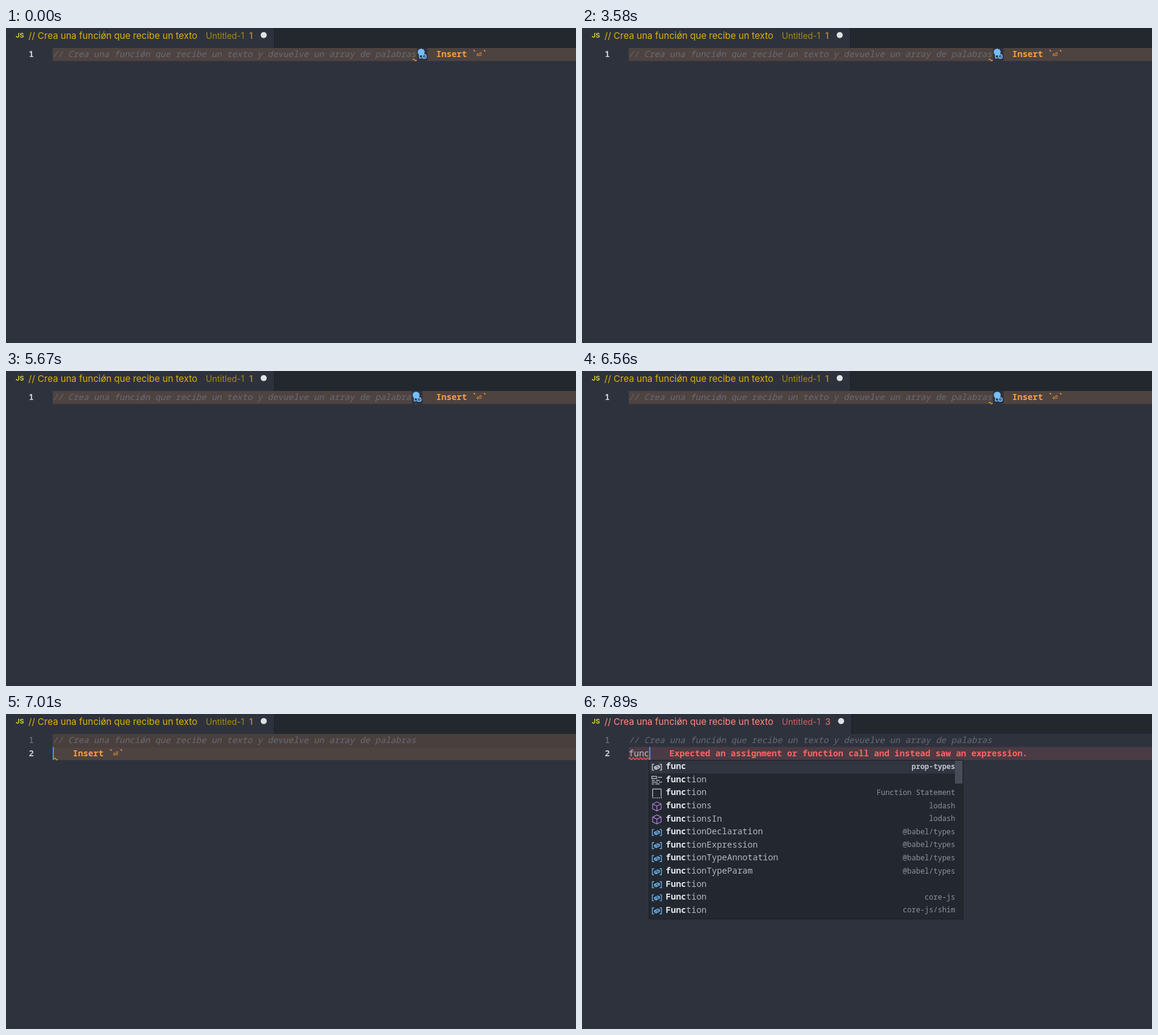
Recreate the animation shown at these times as an HTML page. Size 940x521 px, loop 8 s.

```html
<!DOCTYPE html>
<html lang="es">
<head>
<meta charset="utf-8">
<title>Editor</title>
<style>
  html, body { margin: 0; width: 100%; height: 100%; overflow: hidden; background: #2e323d; }
  svg { display: block; width: 940px; height: 521px; }
  text { white-space: pre; }
  .ui { font-family: Inter, "Open Sans", sans-serif; }
  .code { font: 500 14px "Noto Sans Mono", "DejaVu Sans Mono", monospace; letter-spacing: .04px; }
  .comment { font-style: italic; fill: #686c77; }
  .num { text-anchor: end; fill: #7d818b; }
  .num.active { fill: #c9ccd3; font-weight: 600; }
  .note { font-weight: 600; }
  .label { fill: #b3b8c1; }
  .label .hit { fill: #e4e7ec; font-weight: 700; }
  .detail { font-size: 12px; letter-spacing: 0; text-anchor: end; fill: #8d929b; }
  .detail.picked { fill: #bfc3ca; font-weight: 600; }
  .line { fill: none; stroke-width: 1.2; }
</style>
</head>
<body>
<svg viewBox="0 0 940 521" xmlns="http://www.w3.org/2000/svg">
  <defs>
    <g id="variable" class="line" stroke="currentColor">
      <path d="M4 -5H1V5H4M13 -5H16V5H13"/>
      <path d="M4.500 -.5L10 -3.200L12.800 -1.800V.8L7.300 3.500L4.500 2.100ZM4.500 -.5L7.300 .9L12.800 -1.800M7.300 .9V3.500"/>
    </g>
    <g id="keyword" class="line" stroke="currentColor">
      <path d="M0 -6.500H8V-3H0ZM10 -5H17M0 0H5M7 0H13M0 3H10M12 3H17M0 6H4M6 6H13"/>
    </g>
    <g id="snippet" class="line" stroke="currentColor">
      <path d="M1.500 6V-7H15.500V6"/>
      <path d="M1 7.500H17" stroke-dasharray="2 1.500"/>
    </g>
    <g id="method" class="line" stroke="currentColor">
      <path d="M8.500 -7.500L15.500 -4V4L8.500 7.500L1.500 4V-4ZM1.500 -4L8.500 -.5L15.500 -4M8.500 -.5V7.500"/>
    </g>
    <g id="bulb">
      <rect width="17.400" height="21.600" fill="#2e323d"/>
      <circle cx="6.900" cy="6.900" r="5.700" fill="#75beff"/>
      <path d="M4 11V16.500H8" fill="none" stroke="#75beff" stroke-width="1.500"/>
      <circle cx="12" cy="14.200" r="3" fill="#2e323d" stroke="#75beff" stroke-width="1.700"/>
      <circle cx="12" cy="14.200" r="1" fill="#75beff"/>
    </g>
  </defs>
  <g id="stage"></g>
</svg>
<script>
const LOOP = 8000, X0 = 77, CH = 8.44, ROW = 21.6, TOP = 33;
const COMMENT = "// Crea una funciǿn que recibe un texto y devuelve un array de palabras";
const ERROR = "Expected an assignment or function call and instead saw an expression.";
const BLINKS = [150, 600, 1190, 1640, 2090, 2690, 3130, 3580, 4180, 4630, 5070, 6260, 6860];
const TYPED = [7155, 7450, 7600, 7745];
const BULBS = [[0, 71], [5220, 0], [5520, 70], [6110, 0], [6560, 71], [7010, 0]];
const ITEMS = [
  ["variable", "func", "prop-types"],
  ["keyword", "function", ""],
  ["snippet", "function", "Function Statement"],
  ["method", "functions", "lodash"],
  ["method", "functionsIn", "lodash"],
  ["variable", "functionDeclaration", "@babel/types"],
  ["variable", "functionExpression", "@babel/types"],
  ["variable", "functionTypeAnnotation", "@babel/types"],
  ["variable", "functionTypeParam", "@babel/types"],
  ["variable", "Function", ""],
  ["variable", "Function", "core-js"],
  ["variable", "Function", "core-js/shim"]
];

const col = n => X0 + n * CH;
const rowY = n => TOP + n * ROW;
const baseY = n => 48 + n * ROW;
const passed = (list, t) => list.filter(x => t >= x).length;
const rect = (x, y, w, h, fill) =>
  `<rect x="${x}" y="${y}" width="${w}" height="${h}" fill="${fill}"/>`;
const text = (x, y, cls, str, extra = "") =>
  `<text x="${x}" y="${y}" class="${cls}" ${extra}>${str}</text>`;
const code = (x, row, cls, str, extra) => text(x, baseY(row), "code " + cls, str, extra);
const lineNo = (row, active) => code(46, row, active ? "num active" : "num", row + 1);
const band = (row, fill) => rect(X0, rowY(row), 940 - X0, ROW, fill);

function squiggle(x, end, y, color) {
  let d = `M${x} ${y + 1.5}`;
  for (; x < end; x += 3) d += `l1.500 ${-1.5}l1.500 1.500`.replace(/1\.500 1\.500$/, "1.500 1.500");
  return `<path d="${d}" fill="none" stroke="${color}" stroke-width="1.200"/>`;
}

const wave = (x, n, y, color) =>
  `<path d="M${x} ${y}${"q1.500 -3 3 0t3 0".repeat(n)}" fill="none" stroke="${color}" stroke-width="1.300"/>`;

function insertNote(x, row) {
  const at = n => x + n * CH;
  const fill = 'fill="#ff9d3a"';
  return code(x, row, "note", "Insert `", fill) +
    code(at(7.85), row, "note", "⏎", fill) + code(at(9), row, "note", "`", fill);
}

function header(error) {
  const edge = error ? 444 : 442;
  const main = error ? "#ff8a7d" : "#d9b500";
  const dim = error ? "#c3675f" : "#a68c10";
  return rect(edge, 0, 940 - edge, 33, "#23282f") + rect(edge, 0, 1, 33, "#1b1f25") +
    text(16, 16, "ui", "JS", 'font-size="11" font-weight="700" fill="#cbcb41"') +
    text(37, 18, "ui", COMMENT.slice(0, 39), `font-size="15.050" fill="${main}"`) +
    text(329.5, 18, "ui", "Untitled-1", `font-size="14" fill="${dim}"`) +
    text(401, 18, "ui", error ? 3 : 1, `font-size="14" font-weight="600" fill="${dim}"`) +
    `<circle cx="${error ? 427.3 : 425}" cy="11.700" r="5" fill="#dfe1e5"/>`;
}

function popup() {
  const tint = { keyword: "#c5c8ce", snippet: "#c5c8ce", method: "#b180d7", variable: "#75beff" };
  let out = rect(110.5, 76.5, 518, 262.5, '#232830" stroke="#191d23') +
    rect(111, 77, 517, 21.5, "#303540") + rect(615, 77, 12.5, 38, "#474c58");
  ITEMS.forEach(([icon, name, detail], i) => {
    const row = i + 2;
    const color = i ? tint[icon] : "#e4e7ec";
    out += `<use href="#${icon}" x="115" y="${88 + i * ROW}" color="${color}"/>` +
      code(138, row, "label", `<tspan class="hit">${name.slice(0, 4)}</tspan>${name.slice(4)}`) +
      text(615.5, baseY(row) - .5, "code detail" + (i ? "" : " picked"), detail);
  });
  return out;
}

function draw(t) {
  const length = t >= 5220 && t < 5670 ? 70 : 71;
  const second = t >= 6860, error = t >= 7300;
  const typed = passed(TYPED, t);
  const row = second ? 1 : 0;
  const caret = second ? typed : length;
  const bulb = BULBS.filter(b => t >= b[0]).pop()[1];
  let out = header(error);

  if (!error) out += band(0, second ? "#493f3c" : "#4d4341");
  if (second) out += band(1, error ? "#4b3b44" : "#4d4341");

  out += lineNo(0, !second) + code(X0, 0, "comment", COMMENT.slice(0, length));
  if (second) out += lineNo(1, true) + code(X0, 1, "", "func".slice(0, typed), 'fill="#c1c5cd"');

  const noteX = col(caret + 4) - .5;
  if (error) {
    out += code(noteX, 1, "note", ERROR, 'fill="#ff6464"') +
      wave(X0, Math.round((typed * CH + 1) / 6), 74, "#ff5750");
  } else {
    out += insertNote(noteX, row) + wave(second ? 79 : col(caret) - 5.2, 1, second ? 74.5 : 53, "#d2a915");
  }

  if (passed(BLINKS, t) % 2) out += rect(col(caret) - (second ? 0 : .2), rowY(row), 2, ROW, "#528bff");
  if (bulb) out += `<use href="#bulb" x="${col(bulb) + 1.6}" y="${TOP}"/>`;
  if (t >= 7890) out += popup();
  return out;
}

const stage = document.getElementById("stage");
let last = "";
function tick() {
  const next = draw(performance.now() % LOOP);
  if (next !== last) stage.innerHTML = last = next;
  requestAnimationFrame(tick);
}
tick();
</script>
</body>
</html>
```
